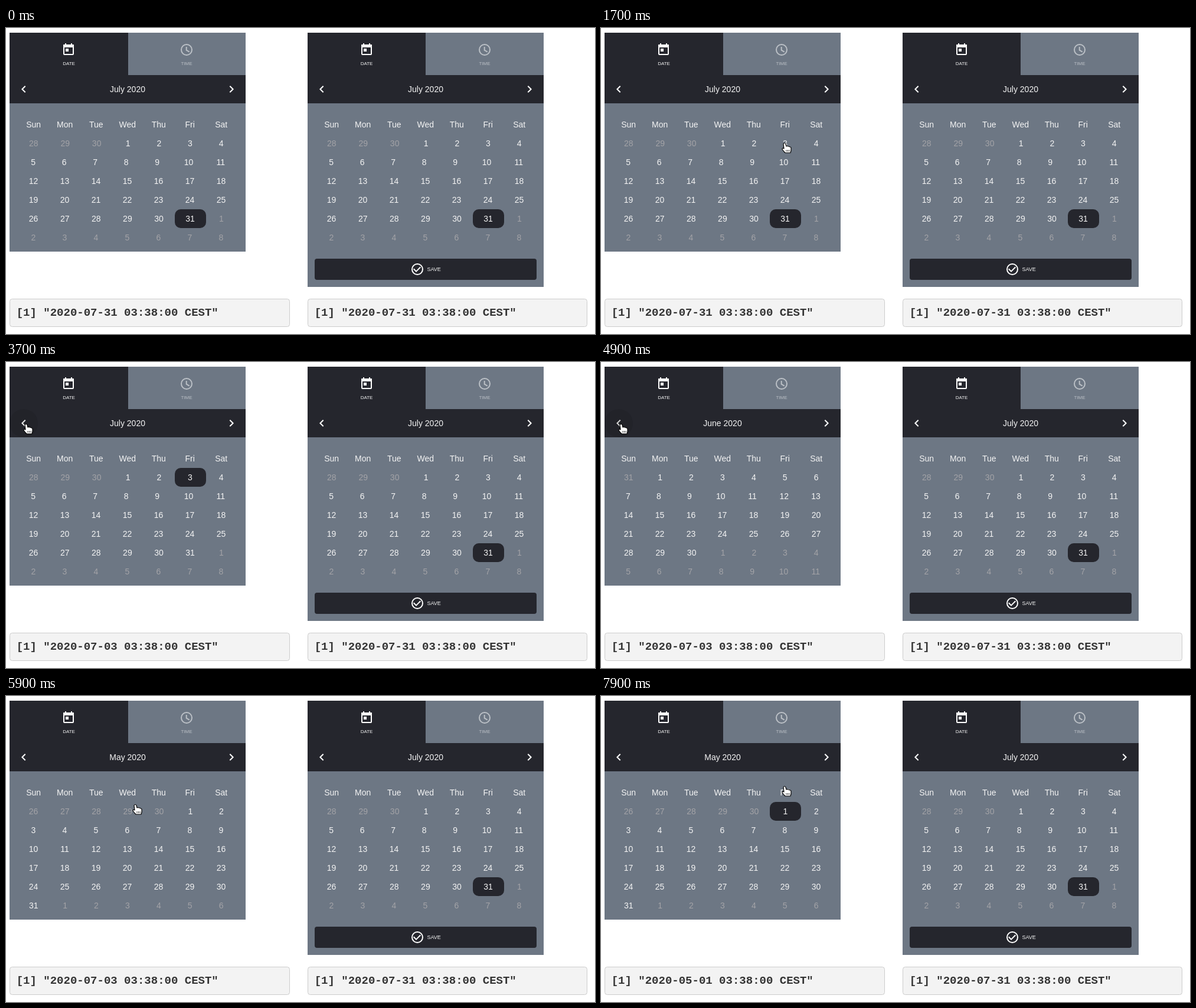
Animation, 998 px wide and 520 px high, one loop 8 s. Source, as an HTML page:

```html
<!DOCTYPE html>
<html lang="en">
<head>
<meta charset="utf-8">
<title>Date pickers</title>
<style>
html, body { margin: 0; width: 100%; height: 100%; overflow: hidden; background: #fff; }
svg { display: block; }
text { font: 14px "Liberation Sans", Arial, sans-serif; fill: #f4f4f4; text-anchor: middle; }
.small { font-size: 8px; }
.save { font-size: 9px; text-anchor: start; }
.dim { fill: #a3a3a7; }
.off { fill: #bbc0c6; }
.dark { fill: #25262d; }
.slate { fill: #6d7784; }
.icon { fill: #fff; }
.line { fill: none; stroke: #fff; stroke-width: 2; }
.faint { stroke: #bbc0c6; }
.box { fill: #f3f3f3; stroke: #ccc; }
.out { font: bold 19px "Liberation Mono", "Courier New", monospace; fill: #333; text-anchor: start; white-space: pre; }
</style>
</head>
<body>
<svg width="998" height="520" viewBox="0 0 998 520">
  <g id="left"></g>
  <g id="right" transform="translate(505 0)"></g>
  <circle id="hover" cx="30" cy="104" r="24" opacity="0"/>
  <circle id="ripple" cx="30" cy="104" r="0" opacity="0"/>
  <g id="pointer" stroke="#000" stroke-width="1.2" stroke-linejoin="round" fill="#fff">
    <path id="arrow" d="M.6 .8V16L4 12.6 6.5 18 9 17 6.4 11.6H11Z"/>
    <g id="hand">
      <path d="M-3 2Q-1-1 1 2L2 6Q4 5 5 6 7 6 8 7 10 7 10 9V13L9 17H0L-2 15-5 11Q-5 8-2 10Z"/>
      <path d="M2 12v3m2.5-3v3m2.5-3v3" stroke-width=".8"/>
    </g>
  </g>
</svg>
<script>
const LOOP = 8000, STEP = 100;
const YEAR = 2020, JULY = 6;
const DAYS = ["Sun", "Mon", "Tue", "Wed", "Thu", "Fri", "Sat"];
const ROW_LEFT = 20, ROW_WIDTH = 371;

const ENTRY = { x: 32, y: -140 };
const MOVES = [
  { from: 500, to: 900, x: 256, y: 166 },
  { from: 1200, to: 1400, x: 312, y: 199 },
  { from: 1600, to: 1900, x: 312, y: 192 },
  { from: 3000, to: 3700, x: 35, y: 105 },
  { from: 5100, to: 5500, x: 59, y: 128 },
  { from: 5600, to: 5900, x: 220, y: 184 },
  { from: 5900, to: 6500, x: 311, y: 192 },
  { from: 6500, to: 6700, x: 314, y: 192 },
  { from: 7800, to: 7900, x: 312, y: 153 }
];

const $ = id => document.getElementById(id);
const clamp = v => Math.min(1, Math.max(0, v));
const easeOut = k => 1 - (1 - k) ** 2;
const rect = (x, y, w, h, cls, r = 0) =>
  `<rect x="${x}" y="${y}" width="${w}" height="${h}" rx="${r}" class="${cls}"/>`;
const ring = (x, y, cls = "") => `<circle cx="${x}" cy="${y}" r="9" class="line ${cls}"/>`;
const line = (d, cls = "") => `<path d="${d}" class="line ${cls}"/>`;
const text = (x, y, str, cls = "") => `<text x="${x}" y="${y}" class="${cls}">${str}</text>`;

const calendarIcon = () =>
  rect(98, 29, 16, 16, "line", 1) + rect(97, 28, 18, 5, "icon", 1) +
  rect(100, 26, 2, 3, "icon") + rect(110, 26, 2, 3, "icon") + rect(101, 35, 5, 5, "icon");
const clockIcon = () =>
  ring(306, 37, "faint") +
  `<g stroke-width="1.5">${line("M305.7 32v5.6l5 3", "faint")}</g>`;

// Two-digit cells take slightly more of the row.
function rowCells(labels) {
  const wide = labels.map(n => n > 9);
  const extra = wide[0] ? 0.8 : 1.8;
  const base = (ROW_WIDTH - wide.filter(Boolean).length * extra) / 7;
  let x = ROW_LEFT;
  return wide.map(isWide => {
    const cell = { x, w: base + (isWide ? extra : 0) };
    x += cell.w;
    return cell;
  });
}

function monthGrid(month, selected) {
  const lead = new Date(YEAR, month, 1).getDay();
  let svg = "";
  for (let row = 0; row < 6; row++) {
    const dates = DAYS.map((_, i) => new Date(YEAR, month, 1 - lead + row * 7 + i));
    const labels = dates.map(d => d.getDate());
    const y = 180 + row * 32;
    rowCells(labels).forEach(({ x, w }, i) => {
      const inside = dates[i].getMonth() === month;
      if (inside && labels[i] === selected) svg += rect(Math.round(x), y, 53, 32, "dark", 10);
      svg += text(x + w / 2, y + 21, labels[i], inside ? "" : "dim");
    });
  }
  return svg;
}

const saveButton = () =>
  rect(18, 392, 376, 36, "dark", 4) + ring(192, 410) +
  line("M185.7 409.3l4.3 4.3 7.3-7.3") + text(208.5, 413, "SAVE", "save");

function picker({ month, selected, output, save }) {
  const tab = save ? 200 : 201;
  const title = new Date(YEAR, month).toLocaleString("en", { month: "long" }) + " " + YEAR;
  return rect(6, 8, 400, save ? 432 : 372, "slate") +
    rect(6, 8, tab, 72, "dark") + rect(6, 80, 400, 48, "dark") +
    calendarIcon() + text(6 + tab / 2, 63, "DATE", "small") +
    clockIcon() + text(306, 63, "TIME", "small off") +
    line("M32.7 98.7l-5.3 5.3 5.3 5.3") + line("M379.3 98.7l5.3 5.3-5.3 5.3") +
    text(206, 109, title) +
    DAYS.map((day, i) => text(46.7 + i * 53, 169, day)).join("") +
    monthGrid(month, selected) + (save ? saveButton() : "") +
    rect(6.5, 460.5, save ? 473 : 474, 47, "box", 4) +
    text(17.7, 489, `[1] "${YEAR}-${output} 03:38:00 CEST"`, "out");
}

function stateAt(t) {
  return {
    month: t < 4400 ? JULY : t < 5000 ? JULY - 1 : JULY - 2,
    selected: t < 2400 ? 31 : t < 4400 ? 3 : t < 7100 ? 0 : 1,
    output: t < 2500 ? "07-31" : t < 7200 ? "07-03" : "05-01"
  };
}

function pointerAt(t) {
  return MOVES.reduce((pos, { from, to, x, y }) => {
    const k = easeOut(clamp((t - from) / (to - from)));
    return { x: pos.x + (x - pos.x) * k, y: pos.y + (y - pos.y) * k };
  }, ENTRY);
}

function drawPointer(t) {
  const pos = pointerAt(t);
  const x = Math.round(pos.x), y = Math.round(pos.y);
  const onTab = y >= 8 && y < 80;
  const onButton = y >= 80 && y < 128 && x < 54;
  const clickable = onTab || onButton || y >= 148;
  $("pointer").setAttribute("transform", `translate(${x} ${y})`);
  $("hand").style.display = clickable ? "" : "none";
  $("arrow").style.display = clickable ? "none" : "";
}

function drawButton(t) {
  $("hover").setAttribute("opacity", t >= 3600 && t < 5400 ? 0.09 : 0);
  const age = t - (t < 4900 ? 4300 : 4900);
  const active = age >= 0 && age < 600;
  $("ripple").setAttribute("r", active ? 21 * clamp((age + 100) / 400) : 0);
  $("ripple").setAttribute("opacity", active ? 0.1 * (1 - age / 600) : 0);
}

let shown = "";
function draw() {
  const t = Math.floor(performance.now() % LOOP / STEP) * STEP;
  const state = stateAt(t), key = JSON.stringify(state);
  if (key !== shown) {
    $("left").innerHTML = picker(state);
    shown = key;
  }
  drawButton(t);
  drawPointer(t);
  requestAnimationFrame(draw);
}

$("right").innerHTML = picker({ month: JULY, selected: 31, output: "07-31", save: true });
draw();
</script>
</body>
</html>
```
